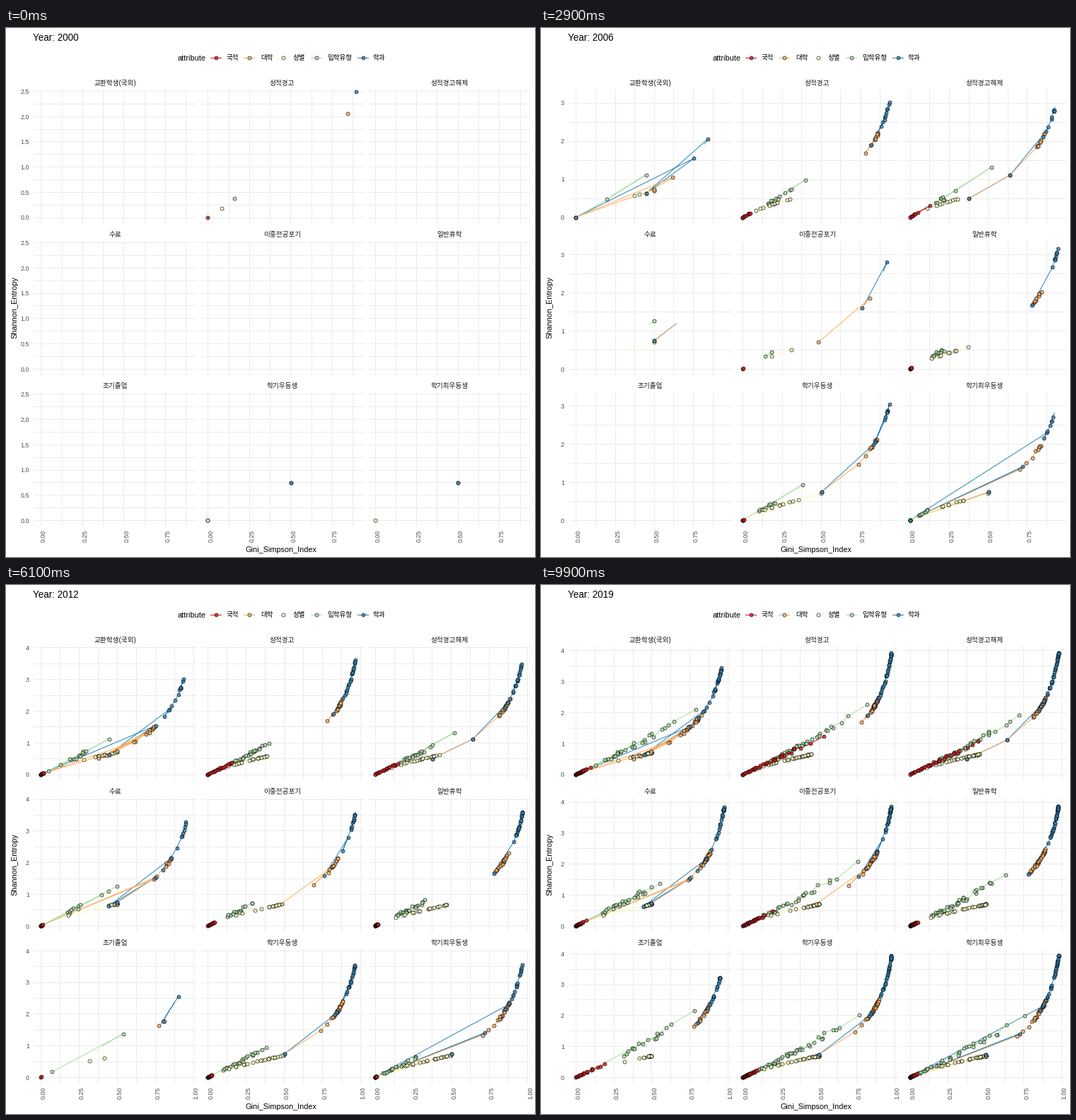
Write a matplotlib script that moves like this. It is 748 px wide and 748 px high and loops after 10000 ms.

```python
import numpy as np
import matplotlib.pyplot as plt
from matplotlib.animation import FuncAnimation
from matplotlib.collections import LineCollection
from matplotlib.colors import to_rgb

SIZE, FRAMES, YEARS = 748, 100, 19
LAST = 2 * YEARS  # two semesters a year
PX = 0.72  # points per pixel at 100 dpi
LEFT, TOP = (49.3, 285.4, 521.7), (86.3, 300.5, 514.7)
WIDTH, HEIGHT, PAD_X, PAD_Y = 231, 190, 10.5, 8.8
INNER_W, INNER_H = 210, 172.7
JITTER = .15

COLORS = {"red": "#d7191c", "orange": "#fdae61", "yellow": "#ffffbf",
          "green": "#abdda4", "blue": "#2b83ba"}
# above 1 a trend settles early, below 1 it speeds up late
EASE = {"red": .5, "orange": 2, "yellow": 3, "green": .5, "blue": 2.5}
ORDER = ["green", "yellow", "orange", "blue", "red"]
LEGEND = [("red", 297, 312, "국적"), ("orange", 344, 360, "대학"),
          ("yellow", 392, 406, "성별"), ("green", 439, 454, "입학유형"),
          ("blue", 505, 519, "학과")]
PANELS = ["교환학생(국외)", "성적경고", "성적경고해제", "수료", "이중전공포기",
          "일반휴학", "조기졸업", "학기우등생", "학기최우등생"]

plt.rcParams["font.family"] = ["Liberation Sans", "Noto Sans CJK JP"]
rng = np.random.default_rng(7)
series = []


def entropy(color, g):
    """Shannon entropy that goes with a Gini-Simpson index."""
    if color == "red":
        return 2.35 * g
    if color == "green":
        return 2.2 * g + .6 * g ** 2
    if color == "yellow":  # exact for a split in two
        p = np.clip((1 - np.sqrt(1 - 2 * g)) / 2, 1e-9, 1)
        return -p * np.log(p) - (1 - p) * np.log(1 - p)
    return -np.log(1 - g) + .3 * g ** 3 * (1 - (g / .98) ** 60)


def add(panel, color, start, opening, low, high):
    """A few opening values, then an eased, noisy trend to the last semester."""
    s = np.arange(start, LAST + 1)
    n = len(opening)
    u = np.linspace(0, 1, len(s) - n)
    trend = low + (high - low) * (1 - (1 - u) ** EASE[color])
    trend += JITTER * trend * (1 - trend) * rng.uniform(-1, 1, len(u))
    g = np.clip(np.append(opening, trend), 0, .5 if color == "yellow" else .98)
    h = entropy(color, g)
    if color != "yellow":
        h[n:] *= 1 + JITTER * (1 - g[n:]) * rng.uniform(-1, 1, len(u))
    series.append((panel, color, np.ceil(s / 2), g, h))


add(0, "blue", 7, [0, .756, .45, .846, .81, .84, .86, .88], .9, .955)
add(0, "orange", 7, [.45, .62, 0, .5, .38, .73, .43, .69, .745, .61], .7, .81)
add(0, "yellow", 7, [.376, .407, .5, .5, .28], .36, .5)
add(0, "green", 8, [0, .2, .45, .05, .13, .28], .2, .77)
add(0, "red", 12, [], 0, .09)

add(1, "blue", 0, [.897, .824, .887, .919], .905, .98)
add(1, "orange", 0, [.846, .784, .82], .84, .88)
add(1, "yellow", 0, [.085, .216], .11, .42)
add(1, "green", 0, [.16, .21, .27, .3, .4, .31], .18, .8)
add(1, "red", 0, [0, 0, 0, .04], 0, .51)

add(2, "blue", 1, [.376, .642, .872, .854, .885], .9, .98)
add(2, "orange", 1, [.376, .642, .813], .83, .885)
add(2, "yellow", 1, [0, .11], .17, .44)
add(2, "green", 1, [.164, .52, .29, .21], .18, .74)
add(2, "red", 3, [0, .128], .01, .46)

add(3, "blue", 10, [.5, .752, .445, .858, .8, .894], .925, .977)
add(3, "orange", 10, [.5, .752, 0, .74, .76], .83, .876)
add(3, "yellow", 10, [.5, .18, .445], .48, .5)
add(3, "green", 10, [.5, .445, 0, .18, .4], .18, .57)
add(3, "red", 14, [], 0, .06)

add(4, "blue", 9, [.765, .923, .885], .94, .976)
add(4, "orange", 9, [.484, .814, .697], .79, .88)
add(4, "yellow", 9, [.31, .186, .225], .38, .5)
add(4, "green", 9, [.145, .186], .14, .73)
add(4, "red", 9, [], 0, .18)

add(5, "blue", 1, [.78, .912, .935, .94], .925, .978)
add(5, "orange", 1, [.795, .786], .8, .885)
add(5, "yellow", 1, [], .14, .5)
add(5, "green", 1, [], .15, .64)
add(5, "red", 1, [], 0, .06)

add(6, "blue", 21, [.902, .8, .907, .869], .88, .95)
add(6, "orange", 21, [.776], .79, .87)
add(6, "yellow", 21, [.32, .417], .47, .5)
add(6, "green", 21, [.075, .54, .346], .34, .76)
add(6, "red", 21, [], 0, .2)

add(7, "blue", 0, [.504, .835, .85, .91, .928, .845], .915, .98)
add(7, "orange", 0, [.504, .739, .784], .82, .89)
add(7, "yellow", 0, [0, .5], .14, .5)
add(7, "green", 0, [0, .383], .11, .78)
add(7, "red", 7, [], 0, .1)

add(8, "blue", 0, [.502, 0, .723, 0, .876, .858], .89, .98)
add(8, "orange", 0, [.502, 0, .705, .745], .8, .89)
add(8, "yellow", 0, [0, .5, 0], .19, .5)
add(8, "green", 1, [0, .09, 0], .05, .78)
add(8, "red", 12, [], 0, .05)

fig = plt.figure(figsize=(SIZE / 100, SIZE / 100), dpi=100, facecolor="white")
ax = fig.add_axes([0, 0, 1, 1])
ax.set(xlim=(0, SIZE), ylim=(SIZE, 0))
ax.axis("off")


def text(x, y, s, px, color="black", ha="center", rotation=0):
    va = "center" if rotation else "center_baseline"
    return ax.text(x, y, s, fontsize=px * PX, color=color, ha=ha, va=va, rotation=rotation)


def dots(color, z):
    return ax.plot([], [], "o", ms=5 * PX, mew=.75 * PX, mfc=(*to_rgb(COLORS[color]), .8),
                   mec=(0, 0, 0, .8), zorder=z)[0]


def stroke(color):
    return ax.plot([], [], color=COLORS[color], lw=PX, zorder=2)[0]


title = text(38, 12.5, "", 13.5, ha="left")
text(243, 41.5, "attribute", 10.9, ha="left")
text(389, 737, "Gini_Simpson_Index", 10.9)
text(12, 395, "Shannon_Entropy", 10.9, rotation=90)
for color, x, label_x, label in LEGEND:
    stroke(color).set_data([x - 7.5, x + 7.5], [41.5, 41.5])
    dots(color, 3).set_data([x], [41.5])
    text(label_x, 41.5, label, 9.5, ha="left")
for k, name in enumerate(PANELS):
    text(LEFT[k % 3] - PAD_X + WIDTH / 2, TOP[k // 3] - 9.3, name, 9.6, "#1a1a1a")

grid = LineCollection([], colors="#ebebeb", linewidths=PX, zorder=1)
ax.add_collection(grid)
x_labels = [[text(0, 718, f"{v / 4:.2f}", 8.9, "#4d4d4d", rotation=90) for v in range(5)]
            for _ in LEFT]
y_labels = [[text(33, 0, "", 8.9, "#4d4d4d", ha="right") for _ in range(6)] for _ in TOP]

artists = [(*s, stroke(s[1]), dots(s[1], 3 + ORDER.index(s[1]) / 10)) for s in series]


def view(i):
    """Largest gini and entropy in the visible range, which grows with time."""
    x = np.interp(i, [0, 17, 29, 53, 73], [.897, .946, .951, .972, .98])
    y = np.interp(i, [0, 17, 29, 41, 53, 73, 99], [2.42, 3.13, 3.2, 3.62, 3.81, 3.925, 3.943])
    return x, y


def draw_axes(x_max, y_max, sx, sy):
    step = .5 if y_max < 2.85 else 1
    xs = np.arange(0, x_max * 1.05, .125) * sx
    ys = np.arange(0, y_max * 1.05, step / 2) * sy
    lines = []
    for left in LEFT:
        for top in TOP:
            x0, y0 = left - PAD_X, top + HEIGHT - PAD_Y
            lines += [[(left + x, top), (left + x, top + HEIGHT)] for x in xs]
            lines += [[(x0, y0 - y), (x0 + WIDTH, y0 - y)] for y in ys]
    grid.set_segments(lines)
    for left, labels in zip(LEFT, x_labels):
        for k, label in enumerate(labels):
            label.set_x(left + 4.3 + k * .25 * sx)
            label.set_visible(k * .25 <= x_max * 1.05)
    for top, labels in zip(TOP, y_labels):
        for k, label in enumerate(labels):
            v = k * step
            label.set_y(top + HEIGHT - PAD_Y - v * sy + .3)
            label.set_text(f"{v:.1f}" if step < 1 else f"{v}")
            label.set_visible(v <= y_max * 1.05)


def update(i):
    t = YEARS * i / (FRAMES - 1)
    title.set_text(f"Year: {2000 + round(t)}")
    x_max, y_max = view(i)
    sx, sy = INNER_W / x_max, INNER_H / y_max
    draw_axes(x_max, y_max, sx, sy)
    for panel, _, year, g, h, line, points in artists:
        x = LEFT[panel % 3] + g * sx
        y = TOP[panel // 3] + HEIGHT - PAD_Y - h * sy
        n = int(np.sum(year <= t))
        points.set_data(x[:n], y[:n])
        px, py = x[:n], y[:n]
        if 0 < n < len(x):  # the line runs ahead to the next year
            f = (t - year[n - 1]) / (year[n] - year[n - 1])
            px = np.append(px, x[n - 1] + (x[n] - x[n - 1]) * f)
            py = np.append(py, y[n - 1] + (y[n] - y[n - 1]) * f)
        line.set_data(px, py)
    return []


anim = FuncAnimation(fig, update, frames=FRAMES, interval=100, repeat=True, repeat_delay=0)
plt.show()
```
